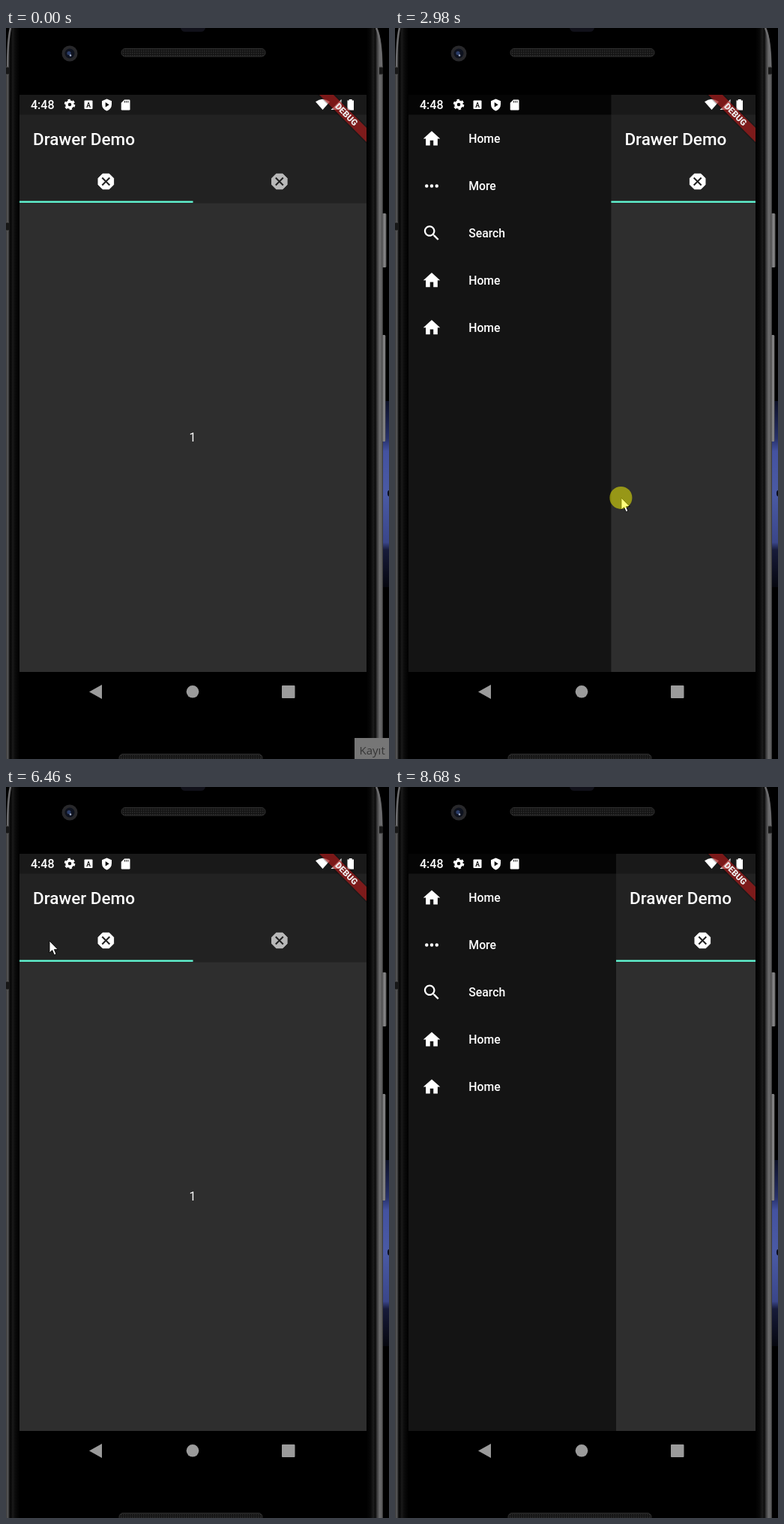
An HTML page that plays this animation: 511x974 px, repeating every 9080 ms.

```html
<!DOCTYPE html>
<html lang="en">
<head>
<meta charset="utf-8">
<title>Drawer Demo</title>
<style>
html, body { margin: 0; width: 511px; height: 974px; overflow: hidden; background: #000; }
svg { display: block; }
text { font-family: Roboto, sans-serif; fill: #fff; }
.label { font-size: 15.8px; font-weight: 500; }
</style>
</head>
<body>
<svg width="511" height="974" viewBox="0 0 511 974">
  <defs>
    <clipPath id="screen"><rect x="18" y="89" width="463" height="769"/></clipPath>
    <clipPath id="drawerClip"><rect id="drawerEdge" x="18" y="89" width="0" height="769"/></clipPath>
    <linearGradient id="leftRim">
      <stop offset="0" stop-color="#3c3c3d"/><stop offset=".14" stop-color="#565657"/>
      <stop offset=".24" stop-color="#1c1c1c"/><stop offset=".34" stop-color="#050505"/>
      <stop offset=".5" stop-color="#1a1a1a"/><stop offset=".66" stop-color="#0c0c0c"/>
      <stop offset="1" stop-color="#000"/>
    </linearGradient>
    <linearGradient id="rightRim">
      <stop offset="0" stop-color="#000"/><stop offset=".25" stop-color="#080808"/>
      <stop offset=".42" stop-color="#1c1c1c"/><stop offset=".54" stop-color="#0a0a0a"/>
      <stop offset=".64" stop-color="#3a3a3b"/><stop offset=".8" stop-color="#6c6c6d"/>
      <stop offset=".94" stop-color="#5a5a5b"/><stop offset="1" stop-color="#2a2a2a"/>
    </linearGradient>
    <linearGradient id="sky" x2="0" y2="1">
      <stop offset="0" stop-color="#0c1026"/><stop offset=".2" stop-color="#26306a"/>
      <stop offset=".27" stop-color="#4452a0"/><stop offset=".5" stop-color="#4a5aa4"/>
      <stop offset=".76" stop-color="#3a468a"/><stop offset=".8" stop-color="#171b3a"/>
      <stop offset="1" stop-color="#05060e"/>
    </linearGradient>
    <linearGradient id="key">
      <stop offset="0" stop-color="#4a4a4a"/><stop offset=".6" stop-color="#8c8c8e"/><stop offset="1" stop-color="#555"/>
    </linearGradient>
    <pattern id="mesh" width="3" height="3" patternUnits="userSpaceOnUse">
      <rect width="3" height="3" fill="#141414"/><rect width="1.5" height="1.5" fill="#303030"/>
    </pattern>
    <path id="home" d="M10 20v-6h4v6h5v-8h3L12 3 2 12h3v8z"/>
    <path id="more" d="M6 10a2 2 0 100 4 2 2 0 000-4zm12 0a2 2 0 100 4 2 2 0 000-4zm-6 0a2 2 0 100 4 2 2 0 000-4z"/>
    <path id="search" d="M15.5 14h-.79l-.28-.27C15.41 12.59 16 11.11 16 9.5 16 5.91 13.09 3 9.5 3S3 5.91 3 9.5 5.91 16 9.5 16c1.61 0 3.09-.59 4.23-1.57l.27.28v.79l5 4.99L20.49 19zm-6 0C7.01 14 5 11.99 5 9.5S7.01 5 9.5 5 14 7.01 14 9.5 11.99 14 9.5 14z"/>
    <g id="stop">
      <path d="M-4.3-10.2H4.3L10.3-4.2V4.2L4.3 10.2H-4.3L-10.3 4.2V-4.2Z" stroke="currentColor" stroke-linejoin="round" fill="currentColor"/>
      <path d="M-5-5L5 5M5-5L-5 5" stroke="#222" stroke-width="2"/>
    </g>
  </defs>

  <!-- handset -->
  <rect width="511" height="974"/>
  <rect x="502" y="497" width="9" height="248" fill="url(#sky)"/>
  <ellipse cx="511" cy="620" rx="2" ry="4" fill="#0b0d1c"/>
  <rect width="18" height="974" fill="url(#leftRim)"/>
  <rect x="481" width="22" height="974" fill="url(#rightRim)"/>
  <path d="M0 0H6Q2 16 1 55H0Z"/>
  <path d="M511 0H495Q502 12 503 55H511Z"/>
  <path d="M6 0Q2 18 2 55M494 0Q500 12 501 55" fill="none" stroke="#6c6c6e" stroke-width="2.5"/>
  <path d="M0 52h4v10H0zM0 259h4v11H0zM498 52h5v10h-5z" fill="#171717"/>
  <path d="M0 52h4M0 62h4M0 259h4M0 270h4M498 52h5M498 62h5" stroke="#505050"/>
  <rect x="501.5" y="247" width="6" height="72" rx="1.5" fill="url(#key)"/>
  <rect x="501.5" y="409" width="5" height="142" rx="1.5" fill="url(#key)"/>
  <path d="M233 0h33q-1 5-6 5h-21q-5 0-6-5" fill="#11111a"/>
  <rect x="154" y="27.5" width="192" height="10.5" rx="5" fill="url(#mesh)" stroke="#303030"/>
  <rect x="151" y="967.5" width="191" height="11" rx="5" fill="url(#mesh)" stroke="#333"/>
  <circle cx="85" cy="34" r="10.5" fill="#28282b"/>
  <circle cx="85" cy="34" r="6.5" fill="#0e121e"/>
  <circle cx="84" cy="33.5" r="2.6" fill="#2b3d68"/>
  <circle cx="86" cy="36.5" r="1.3" fill="#a8b4d0"/>
  <g fill="#9b9b9b">
    <path d="M111 884.5L128 875v19z"/><circle cx="249" cy="884.3" r="8.3"/>
    <rect x="368" y="876" width="17.5" height="17" rx="1"/>
  </g>

  <!-- app -->
  <g clip-path="url(#screen)">
    <rect x="18" y="89" width="463" height="27" fill="#050505"/>
    <rect x="18" y="115.5" width="463" height="743" fill="#141414"/>
    <g clip-path="url(#drawerClip)"><g id="menu"></g></g>
    <g id="page">
      <rect x="18" y="89" width="463" height="27" fill="#191919"/>
      <rect x="18" y="115.5" width="463" height="119" fill="#222"/>
      <rect x="18" y="233.5" width="463" height="625" fill="#2e2e2e"/>
      <text x="36" y="155.5" font-size="22.5" font-weight="500">Drawer Demo</text>
      <use href="#stop" x="133.3" y="204.5" color="#fff"/>
      <use href="#stop" x="364.8" y="204.5" color="#b9b9b9"/>
      <rect x="18" y="230.5" width="231.5" height="2.3" fill="#64ffda"/>
      <text x="249" y="551" font-size="15.8" text-anchor="middle">1</text>
    </g>

    <!-- status bar -->
    <text x="33" y="108.3" font-size="16" font-weight="500">4:48</text>
    <g fill="#fff">
      <circle cx="85" cy="102" r="4" fill="none" stroke="#fff" stroke-width="3.4"/>
      <circle cx="85" cy="102" r="6.2" fill="none" stroke="#fff" stroke-width="2.2" stroke-dasharray="3.25 3.25"/>
      <rect x="104.5" y="96.5" width="11" height="11.5" rx="1"/>
      <path d="M134.5 94.5l6.5 2.8v4.5q0 6-6.5 8.7-6.5-2.7-6.5-8.7v-4.5z"/>
      <path d="M158 95.5h6.2q1.3 0 1.3 1.3v11.4q0 1.3-1.3 1.3h-9.2q-1.3 0-1.3-1.3v-8.4z"/>
      <path d="M413 98.3q9.5-7 19 0L422.5 109z"/>
      <path d="M447.5 95v14h-14z"/>
      <path d="M455.5 96.5h2.3V95h3.8v1.5h2.4v13h-8.5z"/>
    </g>
    <text x="110" y="105.5" font-size="8.5" font-weight="700" text-anchor="middle" style="fill:#111">A</text>
    <path d="M132.7 99l5 3.2-5 3.2z" fill="#111"/>
    <path d="M158.5 97v2.6M160.7 97v2.6M162.9 97v2.6" stroke="#222"/>

    <path d="M416 89H439L481 131V154Z" opacity=".25"/>
    <path d="M418 89H437L481 133V152Z" fill="#b71c1c" opacity=".63"/>
    <text transform="translate(454.4 115.2) rotate(45)" y="4.1" font-size="11.5" font-weight="900" text-anchor="middle" style="fill:#eee">DEBUG</text>
  </g>

  <g id="tip">
    <rect x="465" y="946" width="46" height="28" fill="#767676"/>
    <text x="471.5" y="968" font-size="15" style="font-family:'Open Sans',sans-serif;fill:#363636">Kayıt</text>
  </g>
  <g id="mouse">
    <path d="M0 0V16L3.7 12.6 6.3 18.8 9 17.6 6.4 11.6H11.3Z" fill="#fff" stroke="#000" stroke-width=".9"/>
    <circle id="press" cx="-.5" r="15" fill="#ff0" opacity=".5"/>
  </g>
</svg>
<script>
const LOOP = 9080, OPEN = 277;
const SHOWN = [70, 8680], DRAG = [1470, 3330], TAP = [4200, 4300], FLICK = [6880, 7040];
const $ = id => document.getElementById(id);

const clamp = (v, lo, hi) => Math.min(hi, Math.max(lo, v));
const smooth = u => u * u * (3 - 2 * u);
const easeIn = p => u => u ** p;
const easeOut = p => u => 1 - (1 - u) ** p;
const ramp = (t, from, to, ease = smooth) => ease(clamp((t - from) / (to - from), 0, 1));
const within = (t, [from, to]) => t >= from && t < to;

// each move of the hand: start, end, where it stops, easing
const moves = [
  [70, 250, 307, 798],
  [510, 1270, 23, 630],
  [1470, 2340, 94.5, 631, easeIn(1.6)],
  [2340, 3260, 338, 625, easeOut(1.6)],
  [3330, 3740, 352, 476],
  [4000, 4200, 371, 485],
  [4410, 4880, 196, 406],
  [4880, 5840, 60, 342],
  [5910, 6460, 58, 205],
  [6460, 6810, 28, 358],
  [6890, 7070, 343, 350],
  [7490, 7620, 316, 290],
  [7620, 8100, 471, 700],
  [8100, 8330, 402, 871],
  [8400, 8680, 414, 952]
];

function pointer(t) {
  let x = 470, y = 955;
  for (const [from, to, toX, toY, ease] of moves) {
    const k = ramp(t, from, to, ease);
    x += (toX - x) * k;
    y += (toY - y) * k;
  }
  return [x, y];
}

// follows the finger while dragged, then closes on a tap and opens on a flick
function drawerWidth(t, x) {
  if (t < DRAG[0]) return 0;
  if (t < DRAG[1]) return clamp((x - 26) * 0.98, 0, OPEN);
  return OPEN * (1 - ramp(t, 4300, 4637) + ramp(t, 6908, 7340, easeOut(2)));
}

const items = [["home", "Home"], ["more", "More"], ["search", "Search"], ["home", "Home"], ["home", "Home"]];
$("menu").innerHTML = items.map(([icon, label], i) => {
  const y = 32 + 63 * i;
  return `<use href="#${icon}" transform="translate(17.5 ${y - 13.5}) scale(1.126)" fill="#fff"/>
    <text class="label" x="80.3" y="${y + 5.7}">${label}</text>`;
}).join("");

const show = (id, on) => $(id).setAttribute("visibility", on ? "visible" : "hidden");

function draw(t) {
  const [x, y] = pointer(t), w = drawerWidth(t, x);
  $("page").setAttribute("transform", `translate(${w})`);
  $("drawerEdge").setAttribute("width", w);
  $("menu").setAttribute("transform", `translate(18 115.5) scale(${0.948 + 0.052 * w / OPEN})`);
  $("mouse").setAttribute("transform", `translate(${x} ${y})`);
  show("tip", t < SHOWN[0]);
  show("mouse", within(t, SHOWN));
  show("press", [DRAG, TAP, FLICK].some(span => within(t, span)));
}

const start = performance.now();
function tick() {
  draw((performance.now() - start) % LOOP);
  requestAnimationFrame(tick);
}
draw(0);
requestAnimationFrame(tick);
</script>
</body>
</html>
```
